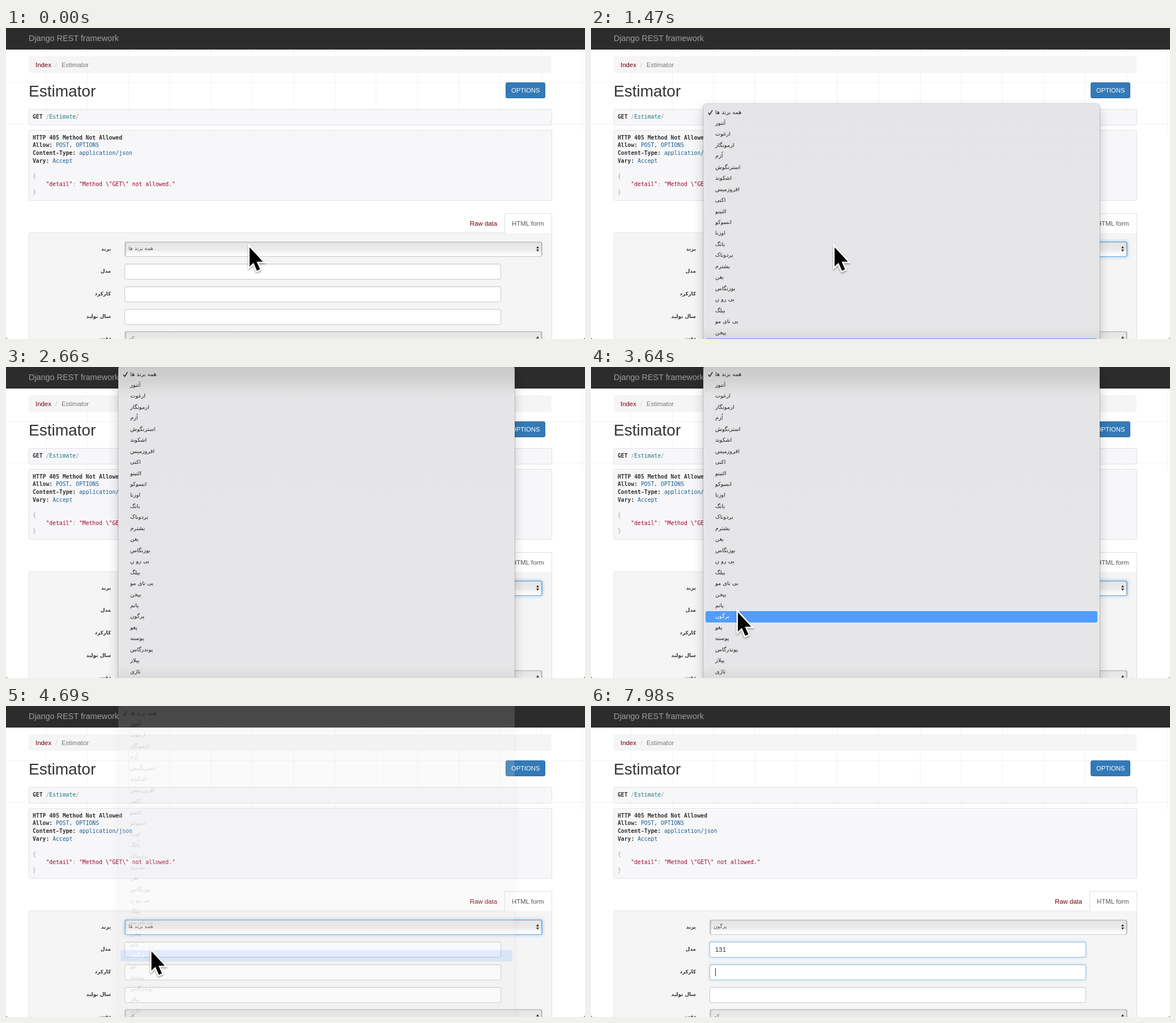
These frames come from a looping animation (1021x549 px, 8000 ms). An HTML page:

```html
<!DOCTYPE html>
<html lang="en">
<head>
<meta charset="utf-8">
<title>Estimator</title>
<style>
html, body { margin: 0; width: 100%; height: 100%; overflow: hidden; background: #666; }
#stage { position: relative; width: 1021px; height: 549px; overflow: hidden; background: #fff;
  border-radius: 0 0 4px 4px; color: #333; font: 11.4px/16px "Liberation Sans", Arial, sans-serif; }
#stage div, #stage pre, #stage svg { position: absolute; box-sizing: border-box; margin: 0; white-space: pre; }
#nav { left: 0; top: 0; width: 1021px; height: 38px; background: #2c2c2c; border-bottom: 1px solid #222; }
#grid { left: 0; top: 38px; width: 1021px; height: 145px;
  background: repeating-linear-gradient(90deg, transparent 0 70px, #f3f3f3 70px 71px, transparent 71px 72.8px),
    linear-gradient(#f3f3f3, #f3f3f3) 0 58px / 100% 1px no-repeat,
    linear-gradient(#f3f3f3, #f3f3f3) 0 131px / 100% 1px no-repeat; }
.crumbs { background: #f5f5f5; border-radius: 3px; }
.code { background: #f7f7f9; border: 1px solid #e1e1e8; border-radius: 3px; }
.well { background: #f5f5f5; border: 1px solid #e0e0e0; border-radius: 3px 0 0 0; }
.tab { background: #fff; border: 1px solid #ddd; border-bottom: 0; border-radius: 3px 3px 0 0; }
.btn { background: #337ab7; border: 1px solid #2e6da4; border-radius: 3px; }
.input, .select { background: #fff; border: 1px solid #ccc; border-radius: 3px; box-shadow: inset 0 1px 1px rgba(0,0,0,.075); }
.select { background: linear-gradient(#e4e4e4, #ebebeb 55%, #f8f8f8 75%, #fff);
  box-shadow: inset 2px 0 2px -1px rgba(0,0,0,.3), inset -2px 0 2px -1px rgba(0,0,0,.3), inset 0 1px 1px rgba(0,0,0,.1); }
.ring { inset: -1px; border: 1px solid #66afe9; border-radius: 3px; box-shadow: 0 0 6px rgba(102,175,233,.6); opacity: 0; }
.brand { color: #9d9d9d; font-size: 14.4px; }
.link { color: #730008; }
.dim { color: #777; }
.h1 { font-size: 28px; line-height: 36px; }
.white { color: #fff; font-size: 11.2px; }
.fa { font: 9.2px/16px "DejaVu Sans", sans-serif; color: #555; }
.label { font-weight: bold; font-size: 8.8px; color: #333; }
pre { font: 9.72px/13.74px "DejaVu Sans Mono", monospace; }
pre i { font-style: normal; color: #93a1a1; }
pre em { font-style: normal; color: #195f91; }
pre s { text-decoration: none; color: #a0002c; }
pre u { text-decoration: none; color: #177a80; }
#menu { left: 198px; width: 699px; height: 900px; border-radius: 5px;
  background: linear-gradient(#c9c9ca 0, #d3d3d4 25px, #e5e5e7 52px, #e6e6e8 528px, #dadadb 549px) fixed;
  box-shadow: 0 0 0 .6px rgba(0,0,0,.3), 0 8px 20px rgba(0,0,0,.2); }
#bar { left: 4px; width: 691px; height: 19.45px; border-radius: 3px; background: #529cfd; }
#menu .fa { left: 21px; font-size: 9.8px; color: #222; }
#menu .on { color: #fff; }
.caret { width: 1px; height: 14px; background: #222; }
#cursor { left: 0; top: 0; width: 50px; height: 60px; overflow: visible; filter: drop-shadow(0 2px 1.5px rgba(0,0,0,.35)); }
</style>
</head>
<body>
<div id="stage"></div>
<script>
const stage = document.getElementById("stage");
const LOOP = 8000, STEP = 70, ROW = 19.45;

function add(parent, html) {
  parent.insertAdjacentHTML("beforeend", html);
  return parent.lastElementChild;
}
const box = (cls, x, y, w, h) =>
  add(stage, `<div class="${cls}" style="left:${x}px;top:${y}px;width:${w}px;height:${h}px"></div>`);
const text = (cls, x, y, str, half = 8) =>
  add(stage, `<div class="${cls}" style="left:${x}px;top:${y - half}px">${str}</div>`);
const code = (y, html) => add(stage, `<pre style="left:47px;top:${y - 6.87}px">${html}</pre>`);
const ringOf = el => add(el, '<div class="ring"></div>');

// Page
add(stage, '<div id="nav"></div>');
add(stage, '<div id="grid"></div>');
text("brand", 40, 18, "Django REST framework");
box("crumbs", 40, 50, 922, 29);
text("link", 52, 65, "Index");
text("dim", 87, 65, '<span style="color:#ccc">/</span>');
text("dim", 98, 65, "Estimator");
text("h1", 40, 112, "Estimator", 18);
box("btn", 880.5, 95.5, 70.5, 28);
text("white", 891, 109.5, "OPTIONS");
box("code", 40, 143, 923, 28.5);
code(157, "<b>GET</b> <i>/</i><u>Estimate</u><i>/</i>");
box("code", 40, 180, 923, 124.5);
code(193.5, `<b>HTTP 405 Method Not Allowed</b>
<b>Allow:</b> <em>POST, OPTIONS</em>
<b>Content-Type:</b> <em>application/json</em>
<b>Vary:</b> <em>Accept</em>

<i>{</i>
    <s>"detail"</s><i>:</i> <s>"Method \\"GET\\" not allowed."</s>
<i>}</i>`);

// Form
box("well", 40, 360.5, 922.5, 220);
box("tab", 879, 327, 83.5, 35);
text("link", 818, 344.5, "Raw data");
text("", 892, 344.5, '<span style="color:#555">HTML form</span>');
["برند", "مدل", "کارکرد", "سال تولید", "دقت"].forEach((name, i) => {
  const el = text("fa label", 0, 389.5 + 39.7 * i, name);
  el.style.left = "auto";
  el.style.right = 1021 - 185 + "px";
});
const arrows = y => add(stage, `<svg style="left:934px;top:${y}px" width="8" height="12">
  <path d="M1 5 3.5 1 6 5zM1 7 3.5 11 6 7z" fill="#333"/></svg>`);
const brandRing = ringOf(box("select", 209, 376.5, 737, 27.5));
const brandText = text("fa", 216, 389, "");
arrows(384);
const modelRing = ringOf(box("input", 208.5, 416, 664, 28));
const mileRing = ringOf(box("input", 208.5, 455.8, 664, 28));
box("input", 208.5, 495.5, 664, 28);
box("select", 209, 535.3, 737, 27.5);
text("fa", 216, 548, "کم");
arrows(542.5);
const modelText = text("", 219, 430, "");
const caret = box("caret", 219, 423, 1, 14);

// Drop-down list
const names = ["همه برند ها", "آتنور", "ارغوت", "ارمونگار", "اُزم", "استرنگوش", "اشکوند", "افروزمیس",
  "اکنی", "التینو", "انسوکو", "اوزنا", "باتگ", "بردوناک", "بشترم", "بغن", "بوزنگاس", "بی رو ن",
  "بیلگ", "بی نای مو", "بیخن", "پاتم", "پرگون", "پغو", "پوسنه", "پوندرگاس", "پیلاز", "تاژی"];
const PICK = 22;
const menu = add(stage, '<div id="menu"></div>');
const bar = add(menu, '<div id="bar"></div>');
const rows = names.map((name, i) =>
  add(menu, `<div class="fa" style="top:${6.5 + ROW * i}px">${name}</div>`));
const check = add(menu, `<svg style="left:8px;top:10px" width="10" height="10">
  <path d="M1 5.5 3.4 8.6 8.2 1.2" fill="none" stroke="currentColor" stroke-width="1.5"/></svg>`);

const cursor = add(stage, `<svg id="cursor"><path d="M0 0V34L7 27.5 13 41.5 18.5 39 12.5 25.5H23.5Z"
  stroke="#fff" stroke-width="5" paint-order="stroke" stroke-linejoin="miter"/></svg>`);

// Motion
const clamp = v => Math.max(0, Math.min(1, v));
const lerp = (a, b, p) => a + (b - a) * p;
const within = (t, a, b) => t >= a && t < b;
const ramp = (t, start) => clamp((t - start + STEP) / 150);

// time, x, y of the pointer tip
const path = [[3640, 259, 433], [3780, 258, 428], [3850, 258, 428], [3990, 258, 437], [4130, 258, 436], [4200, 256.5, 433]];
function pointer(t) {
  if (t < 1540) return [429.5, 387];
  if (t <= path[0][0]) return path[0].slice(1);
  const i = path.findIndex(k => k[0] > t);
  if (i < 0) return path[path.length - 1].slice(1);
  const [a, b] = [path[i - 1], path[i]];
  const p = (t - a[0]) / (b[0] - a[0]);
  return [lerp(a[1], b[1], p), lerp(a[2], b[2], p)];
}

function menuTop(t) {
  if (t < 1470) return 375;
  if (t < 2240) return 134;
  const p = clamp((t - 2170) / 490);
  return lerp(134, -2, 1 - (1 - p) ** 3);
}

function active(t) {
  if (t < 1470) return 0;
  if (t < 2240) return 21;
  if (t < 3640 || within(t, 4410, 4480)) return -1;
  return within(t, 3780, 3920) ? 21 : PICK;
}

function draw(t) {
  const shown = within(t, 140, 4760), row = active(t);
  menu.style.display = shown ? "" : "none";
  menu.style.opacity = t < 4550 ? 1 : clamp(1 - (t - 4480) / 253);
  menu.style.top = menuTop(t) + "px";
  bar.style.display = row < 0 ? "none" : "";
  bar.style.top = 5.2 + ROW * row + "px";
  rows.forEach((el, i) => el.classList.toggle("on", i === row));
  check.style.color = row === 0 ? "#fff" : "#222";

  const [x, y] = pointer(t);
  cursor.style.transform = `translate(${x}px,${y}px)`;
  cursor.style.display = t < 1540 || within(t, 3150, 4900) ? "" : "none";

  brandText.textContent = names[t < 4830 ? 0 : PICK];
  brandRing.style.opacity = ramp(t, 140) - ramp(t, 5110);
  modelRing.style.opacity = ramp(t, 5110) - ramp(t, 7980);
  mileRing.style.opacity = ramp(t, 7980);

  const typed = [6720, 6930, 7140].filter(k => t >= k).length;
  const next = t >= 7980;
  modelText.textContent = "131".slice(0, typed);
  caret.style.display = within(t, 5180, 5600) || within(t, 6160, 7630) || next ? "" : "none";
  caret.style.left = 219 + (next ? 0 : 6.4 * typed) + "px";
  caret.style.top = next ? "463px" : "423px";
}

const start = performance.now();
function frame() {
  const t = (performance.now() - start) % LOOP;
  draw(Math.floor(t / STEP) * STEP);
  requestAnimationFrame(frame);
}
frame();
</script>
</body>
</html>
```
